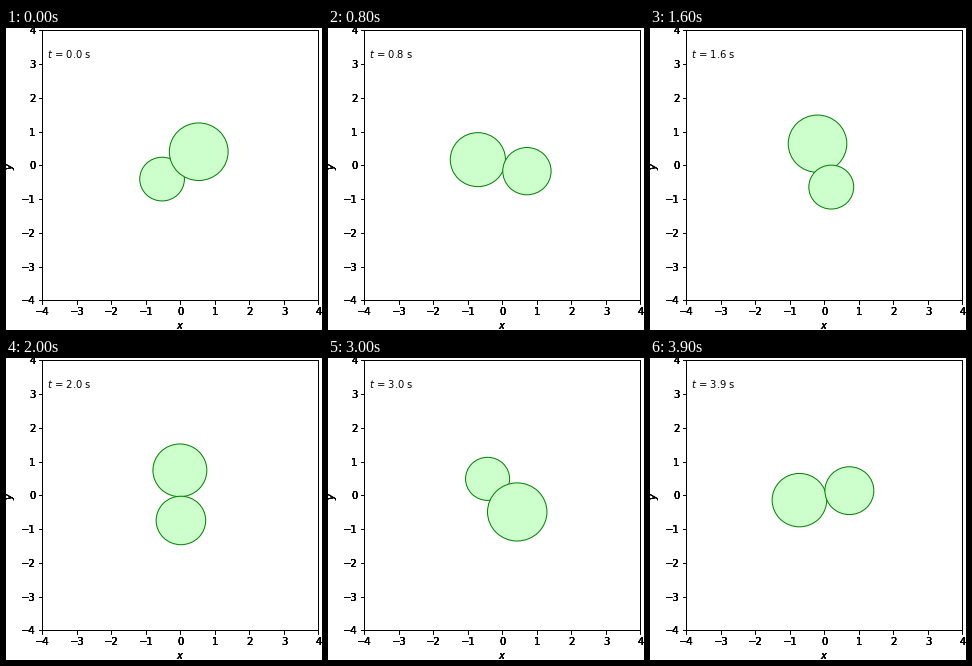
These frames come from a looping animation (316x302 px, 4 s). A matplotlib script:

```python
import numpy as np
import matplotlib.pyplot as plt
from matplotlib.animation import FuncAnimation
from matplotlib.patches import Circle

W, H, DPI = 316, 302, 72
LEFT, TOP, AX_W, AX_H = 36.4, 2.4, 276, 270
FRAMES, INTERVAL = 40, 100
R = 0.75         # radius and distance of each ball from the origin
DEPTH = 0.3      # growth of a ball per unit of depth
LAYERS = 5       # stacked axes give the heavy look of the labels

plt.rcParams.update({"font.family": "DejaVu Sans", "font.size": 10})
fig = plt.figure(figsize=(W / DPI, H / DPI), dpi=DPI, facecolor="white")


def add_layer():
    box = [LEFT / W, 1 - (TOP + AX_H) / H, AX_W / W, AX_H / H]
    layer = fig.add_axes(box, facecolor="none")
    layer.set(xlim=(-4, 4), ylim=(-4, 4), xlabel="$x$", ylabel="$y$")
    layer.set_xticks(range(-4, 5))
    layer.set_yticks(range(-4, 5))
    return layer


ax = [add_layer() for _ in range(LAYERS)][-1]


def add_ball(zorder):
    return ax.add_patch(Circle((0, 0), R, facecolor="#ccffcc",
                               edgecolor="green", linewidth=1, zorder=zorder))


back, front = add_ball(1), add_ball(2)
clock = ax.text(-3.866, 3.18, "")


def update(i):
    t = i * INTERVAL / 1000
    a = t + 1    # polar angle and azimuth are equal
    x, y, z = R * np.sin(a) ** 2, R * np.cos(a), R * np.sin(a) * np.cos(a)
    for ball, side in ((front, 1), (back, -1)):
        ball.center = side * x, side * y
        ball.set_radius(R + side * DEPTH * z)
    clock.set_text(f"$t$ = {t:.1f} s")
    return back, front, clock


anim = FuncAnimation(fig, update, frames=FRAMES, interval=INTERVAL,
                     repeat=True, repeat_delay=0, blit=False)
plt.show()
```
